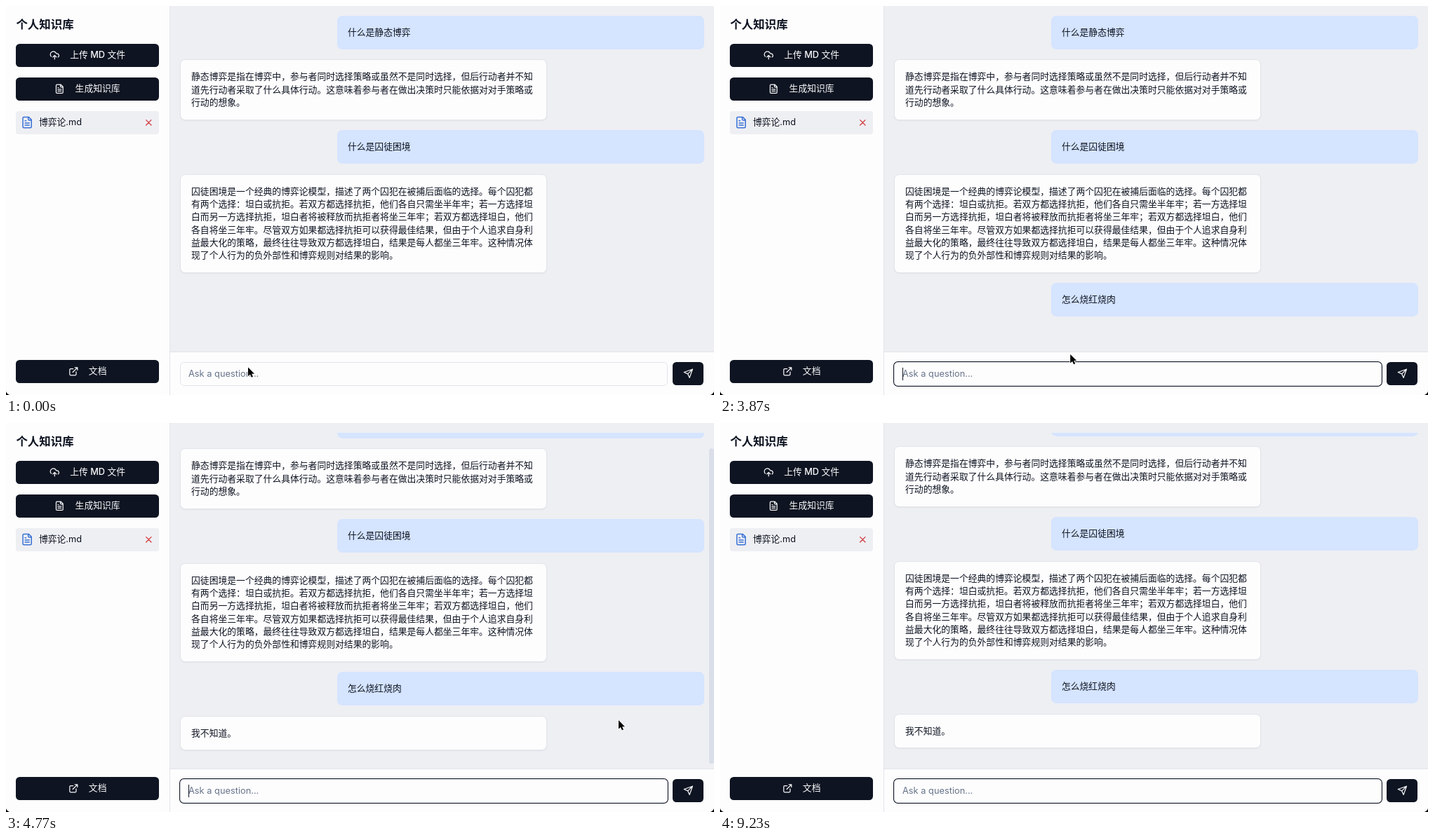
Write an HTML page that moves like this. It is 1009x555 px and loops after 9.26 s.

```html
<!DOCTYPE html>
<html lang="zh-CN">
<head>
<meta charset="utf-8">
<style>
  html, body { margin: 0; width: 100%; height: 100%; overflow: hidden; background: #000; }
  body { font: 12.82px/18.31px Inter, "Noto Sans CJK SC", "Noto Sans CJK", sans-serif; color: #0d1320; }
  #app { position: relative; width: 1009px; height: 555px; overflow: hidden; background: #eeeff3; border-radius: 0 0 7px 7px; }
  #app > * { position: absolute; box-sizing: border-box; }
  svg { fill: none; stroke: currentColor; stroke-width: 2; stroke-linecap: round; stroke-linejoin: round; flex: none; }
  #side { left: 0; top: 0; width: 234px; height: 555px; background: #fdfdfe; border-right: 1px solid #e1e4ea; }
  h1 { margin: 0; left: 14.4px; top: 14px; font-size: 16.48px; line-height: 25.6px; font-weight: 600; }
  .btn { left: 14px; width: 204px; height: 33px; display: flex; align-items: center; justify-content: center; gap: 14.65px;
    background: #0e1421; color: #fafbfd; border-radius: 5.5px; font-weight: 500; }
  #file { left: 14px; top: 149.5px; width: 204px; height: 33px; padding: 0 7.3px; display: flex; align-items: center; gap: 7.3px;
    background: #eeeff3; border-radius: 3.7px; }
  #file span { flex: 1; }
  #view { left: 234px; top: 14px; width: 775px; height: 464px; overflow: hidden; }
  #list { position: absolute; left: 14.4px; top: .2px; width: 746.2px; }
  .msg { box-sizing: border-box; width: 522.3px; margin-bottom: 14.65px; padding: 14px 14.65px 15.3px; border-radius: 7.3px;
    white-space: pre; font-family: "Noto Sans CJK SC", "Noto Sans CJK", sans-serif; }
  .ask { margin-left: auto; background: #d5e4ff; }
  .reply { background: #fdfdfe; border: 1px solid #e1e4ea; box-shadow: 0 1px 2px rgba(0,0,0,.05); }
  #thumb { left: 1002px; top: 0; width: 6.5px; height: 450px; border-radius: 4px; background: #dadee8; }
  #bar { left: 234px; top: 492.5px; width: 775px; height: 62.5px; background: #fdfdfe; border-top: 1px solid #e1e4ea; }
  #input { left: 248px; top: 508px; width: 695px; height: 33.5px; padding-left: 11px; line-height: 31.5px; white-space: pre;
    background: #fdfdfe; border: 1px solid #dfe3ea; border-radius: 5.5px; }
  #input.focus { box-shadow: 0 0 0 1px #0e1421; }
  #input.empty { color: #667389; }
  #caret { top: 516px; width: 1px; height: 18px; background: #0d1320; }
  #send { left: 950px; top: 508px; width: 44px; }
  #pointer { left: 0; top: 0; overflow: visible; stroke-linecap: butt; }
</style>
</head>
<body>
<div id="app">
  <div id="side"></div>
  <h1>个人知识库</h1>
  <div class="btn" style="top:54px" data-icon="upload">上传 MD 文件</div>
  <div class="btn" style="top:101.7px" data-icon="doc">生成知识库</div>
  <div id="file" data-icon="doc" data-size="18.3" data-color="#3a72d6"><span>博弈论.md</span></div>
  <div class="btn" style="top:504.8px" data-icon="link">文档</div>
  <div id="view"><div id="list"></div></div>
  <div id="thumb"></div>
  <div id="bar"></div>
  <div id="input"></div>
  <div id="caret"></div>
  <div id="send" class="btn" data-icon="plane"></div>
  <svg id="pointer" width="20" height="20">
    <path id="arrow" d="M0 0V12.6L2.9 10L4.9 14.3L7 13.4L5.1 9.2H9Z" fill="#000" stroke="#fff" stroke-width="1.6" paint-order="stroke"/>
    <g id="beam">
      <path d="M-3-7.5Q0-7.5 0-5.5Q0-7.5 3-7.5M0-5.5V5.5M-3 7.5Q0 7.5 0 5.5Q0 7.5 3 7.5M-1.5 2H1.5" stroke="#fff" stroke-width="2.6"/>
      <path d="M-3-7.5Q0-7.5 0-5.5Q0-7.5 3-7.5M0-5.5V5.5M-3 7.5Q0 7.5 0 5.5Q0 7.5 3 7.5M-1.5 2H1.5" stroke="#111" stroke-width="1.2"/>
    </g>
  </svg>
</div>
<script>
const $ = id => document.getElementById(id);
const LOOP = 9260, QUESTION = '怎么烧红烧肉';
const FOCUS = 450, TYPE = 1100, TYPE_END = 2700, SUBMIT = 3200, ANSWER = 4490;

const icons = {
  upload: 'M4 14.9A7 7 0 1 1 15.71 8h1.79a4.5 4.5 0 0 1 2.5 8.24M12 12v9M16 16l-4-4-4 4',
  doc: 'M15 2H6a2 2 0 0 0-2 2v16a2 2 0 0 0 2 2h12a2 2 0 0 0 2-2V7ZM14 2v4a2 2 0 0 0 2 2h4M10 9H8M16 13H8M16 17H8',
  link: 'M15 3h6v6M10 14 21 3M18 13v6a2 2 0 0 1-2 2H5a2 2 0 0 1-2-2V8a2 2 0 0 1 2-2h6',
  plane: 'M22 2 11 13M22 2l-7 20-4-9-9-4Z',
  cross: 'M18 6 6 18M6 6l12 12'
};
const icon = (name, size = 14.65, color = 'currentColor') =>
  `<svg width="${size}" height="${size}" viewBox="0 0 24 24" style="color:${color}"><path d="${icons[name]}"/></svg>`;
for (const el of document.querySelectorAll('[data-icon]'))
  el.insertAdjacentHTML('afterbegin', icon(el.dataset.icon, el.dataset.size, el.dataset.color));
$('file').insertAdjacentHTML('beforeend', icon('cross', 14.65, '#d03438'));

const messages = [
  '什么是静态博弈',
  `静态博弈是指在博弈中，参与者同时选择策略或虽然不是同时选择，但后行动者并不知
道先行动者采取了什么具体行动。这意味着参与者在做出决策时只能依据对对手策略或
行动的想象。`,
  '什么是囚徒困境',
  `囚徒困境是一个经典的博弈论模型，描述了两个囚犯在被捕后面临的选择。每个囚犯都
有两个选择：坦白或抗拒。若双方都选择抗拒，他们各自只需坐半年牢；若一方选择坦
白而另一方选择抗拒，坦白者将被释放而抗拒者将坐三年牢；若双方都选择坦白，他们
各自将坐三年牢。尽管双方如果都选择抗拒可以获得最佳结果，但由于个人追求自身利
益最大化的策略，最终往往导致双方都选择坦白，结果是每人都坐三年牢。这种情况体
现了个人行为的负外部性和博弈规则对结果的影响。`,
  QUESTION,
  '我不知道。'
].map((text, i) => {
  const el = document.createElement('div');
  el.className = 'msg ' + (i % 2 ? 'reply' : 'ask');
  el.textContent = text;
  return $('list').appendChild(el);
});

// Keys: time, then one or more values
const scrollKeys = [[4510, 0], [4530, 1], [4630, 18], [4770, 40], [4830, 42.4], [4880, 43]];
const pointerKeys = [[0, 345, 515.5], [300, 342.5, 526.5], [3600, 342.5, 526.5], [3850, 480, 500], [4200, 800, 448],
  [4450, 877, 434.5], [4530, 877, 434], [4630, 877, 432], [4770, 873, 424], [5000, 871, 421],
  [5450, 936.5, 428], [8450, 936.5, 428], [8850, 1015, 428]];

function at(keys, t) {
  const i = keys.findIndex(k => k[0] > t);
  if (i < 0) return keys[keys.length - 1].slice(1);
  if (!i) return keys[0].slice(1);
  const a = keys[i - 1], b = keys[i], u = (t - a[0]) / (b[0] - a[0]);
  return a.slice(1).map((v, j) => v + (b[j + 1] - v) * u);
}
const show = (el, on) => el.style.display = on ? '' : 'none';

function draw(t) {
  const [scroll] = at(scrollKeys, t), [x, y] = at(pointerKeys, t);
  show(messages[4], t >= SUBMIT);
  show(messages[5], t >= ANSWER);
  $('list').style.transform = `translateY(${-scroll}px)`;
  // The thumb trails the content by one screen refresh
  $('thumb').style.transform = `translateY(${at(scrollKeys, t - 16)[0] * .96}px)`;
  show($('thumb'), t >= ANSWER && x < 1009);

  const step = (TYPE_END - TYPE) / QUESTION.length;
  const typed = t < TYPE || t >= SUBMIT ? 0 : Math.min(QUESTION.length, 1 + Math.floor((t - TYPE) / step));
  const typing = t >= TYPE && t < TYPE_END;
  $('input').textContent = QUESTION.slice(0, typed) || 'Ask a question...';
  $('input').className = (t >= FOCUS ? 'focus ' : '') + (typed ? '' : 'empty');
  $('caret').style.left = 260 + typed * 12.82 + 'px';
  show($('caret'), t >= FOCUS && (typing || Math.floor((t + 300) / 500) % 2 === 0));

  const overInput = t >= 30 && y > 508 && x < 943;
  show($('arrow'), !overInput);
  show($('beam'), overInput);
  $('pointer').style.transform = `translate(${x}px,${y}px)`;
}

const start = performance.now();
function tick() {
  draw((performance.now() - start) % LOOP);
  requestAnimationFrame(tick);
}
tick();
</script>
</body>
</html>
```
